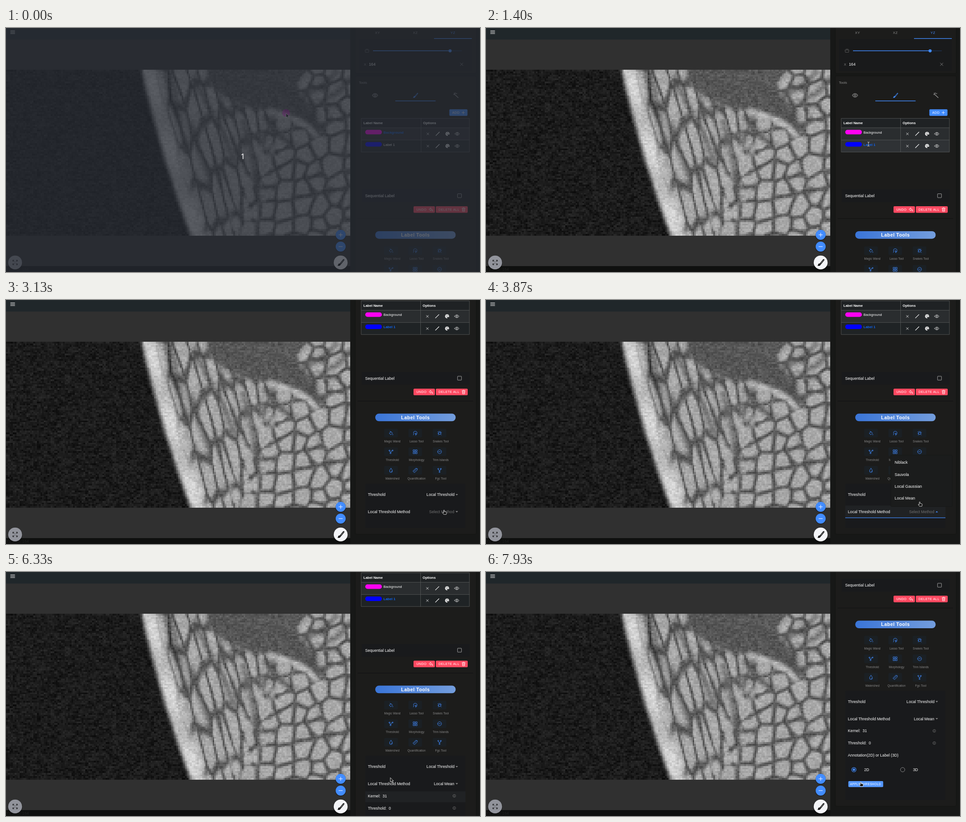
Animation of 1041 by 538 pixels, one loop 8 s. Source, as an HTML page with a canvas:

```html
<!DOCTYPE html>
<html lang="en">
<head>
<meta charset="utf-8">
<title>Label tools</title>
<style>
html, body { margin: 0; width: 100%; height: 100%; overflow: hidden; background: #303030; }
#scan { position: absolute; left: 0; top: 92px; width: 756px; height: 365.5px; image-rendering: pixelated; }
svg { position: absolute; left: 0; top: 0; font-family: "Liberation Sans", Arial, sans-serif; }
text { white-space: pre; }
</style>
</head>
<body>
<canvas id="scan" width="200" height="97"></canvas>
<svg id="ui" width="1041" height="538" viewBox="0 0 1041 538"></svg>
<script>
const BLUE = '#428cff', RED = '#ff4961', GREY = '#808080', WHITE = '#fff';
const clamp = (v, a = 0, b = 1) => Math.min(b, Math.max(a, v));
const mix = (a, b, k) => a + (b - a) * k;
const smooth = (a, b, v) => { const k = clamp((v - a) / (b - a)); return k * k * (3 - 2 * k); };
const hash = (x, y) => { const s = Math.sin(x * 127.1 + y * 311.7) * 43758.5453; return s - Math.floor(s); };

/* ---- scan picture ---- */

// distance between the two nearest jittered cell centres: 0 on a cell wall
function cells(x, y) {
  const cx = Math.floor(x), cy = Math.floor(y);
  let near = 9, next = 9;
  for (let j = cy - 1; j <= cy + 1; j++) for (let i = cx - 1; i <= cx + 1; i++) {
    const d = Math.hypot(i + .15 + .7 * hash(i, j) - x, j + .15 + .7 * hash(j + 40, i) - y);
    if (d < near) { next = near; near = d; } else if (d < next) next = d;
  }
  return next - near;
}

function tone(x, y) {
  const h = y - 92, d = x - (298 + .22 * h + .0002 * h * h);
  const long = cells((x - .27 * h) / 25, h / 105 + x / 160);
  const round = cells(x / 37, y / 39 + x / 190);
  const wall = mix(long, round, clamp((x - 510 + (y - 275) * .3) / 110));
  let v = mix(84, 168, smooth(0, .38, wall));
  v = mix(v, 198 + 14 * Math.sin(h / 23), clamp(1 - (d - 24) / 22));
  v -= 45 * Math.exp(-((d - 50) ** 2) / 60) * smooth(200, 0, h);
  return mix(27, v, smooth(-9, 9, d));
}

function paintScan() {
  const cv = document.getElementById('scan'), g = cv.getContext('2d');
  const w = cv.width, h = cv.height, k = 756 / w;
  const each = fn => {
    const im = g.getImageData(0, 0, w, h), p = im.data;
    for (let i = 0; i < w * h; i++) {
      const v = fn(i % w, Math.floor(i / w), p[i * 4]);
      p[i * 4] = p[i * 4 + 1] = p[i * 4 + 2] = v;
      p[i * 4 + 3] = 255;
    }
    g.putImageData(im, 0, 0);
  };
  const line = (v, width, ...pts) => {
    g.beginPath();
    for (let i = 0; i < pts.length; i += 2) g.lineTo(pts[i], pts[i + 1]);
    g.strokeStyle = g.fillStyle = `rgb(${v},${v},${v})`;
    g.lineWidth = width;
    width ? g.stroke() : g.fill();
  };
  each((x, y) => tone((x + .5) * k, 92 + (y + .5) * k));
  g.setTransform(1 / k, 0, 0, 1 / k, 0, -92 / k);
  g.lineCap = g.lineJoin = 'round';
  g.filter = 'blur(0.8px)';
  line(86, 0, 438, 85, 462, 140, 505, 166, 545, 180, 595, 178, 650, 203, 692, 240, 682, 178, 648, 150, 638, 118, 665, 85);
  line(78, 6, 362, 95, 372, 150, 385, 215);
  line(82, 7, 412, 105, 440, 165, 470, 215, 500, 290);
  line(80, 7, 400, 205, 425, 270, 450, 340);
  line(76, 7, 520, 205, 538, 265, 556, 385);
  line(72, 8, 568, 195, 592, 232, 632, 258);
  line(78, 7, 650, 150, 690, 130, 725, 98);
  line(82, 7, 690, 165, 730, 140, 756, 112);
  line(172, 9, 582, 185, 630, 200, 662, 218, 688, 247);
  line(208, 4, 582, 184, 630, 199, 662, 217, 684, 240);
  g.setTransform(1, 0, 0, 1, 0, 0);
  g.filter = 'none';
  each((x, y, v) => v + (hash(x + 7, y) + hash(x >> 1, y + 300) - 1) * (v < 45 ? 17 : 21));
}

/* ---- interface ---- */

const rect = (x, y, x2, y2, fill, r = 0, more = '') =>
  `<rect x="${x}" y="${y}" width="${x2 - x}" height="${y2 - y}" rx="${r}" fill="${fill}" ${more}/>`;
const disc = (x, y, r, fill, more = '') => `<circle cx="${x}" cy="${y}" r="${r}" fill="${fill}" ${more}/>`;
const stroke = (d, x, y, c, w = .9) =>
  `<path d="${d}" transform="translate(${x} ${y})" fill="none" stroke="${c}" stroke-width="${w}" stroke-linecap="round" stroke-linejoin="round"/>`;
const solid = (d, x, y, c) => `<path d="${d}" transform="translate(${x} ${y})" fill="${c}"/>`;
// y is the middle of the capitals
const text = (x, y, s, size = 8.67, fill = WHITE, more = '') =>
  `<text x="${x}" y="${y + size * .36}" font-size="${size}" fill="${fill}" ${more}>${s}</text>`;
const group = (id, body, more = '') => `<g id="${id}" ${more}>${body}</g>`;
const MID = 'text-anchor="middle"', BOLD = 'font-weight="bold"', WIDE = 'letter-spacing=".42"';

const CROSS = 'M-2.3-2.3L2.3 2.3M2.3-2.3L-2.3 2.3';
const PLUS = 'M-3 0H3M0-3V3';
const ring = (r, x = 0, y = 0) => `M${x - r} ${y}a${r} ${r} 0 1 0 ${2 * r} 0a${r} ${r} 0 1 0 ${-2 * r} 0`;
const eye = (x, y, c, k = 1) =>
  `<g transform="translate(${x} ${y}) scale(${k})">` +
  stroke('M-5 0Q0-6.6 5 0Q0 6.6-5 0Z' + ring(1.7), 0, 0, c, .9) + '</g>';
const brush = (x, y, c, k = 1) => `<g transform="translate(${x} ${y}) scale(${k})">` +
  stroke('M-.8 1.4L4.4-4.8M.4 2.4L5.4-3.8M4.4-4.8Q6-5.4 5.4-3.8M-.8 1.4L.4 2.4', 0, 0, c, 1) +
  solid('M-1.2 1.8Q-4 1.2-4 3.6Q-4.3 4.8-5.5 5Q-1 6.6.2 3Z', 0, 0, c) + '</g>';
const caret = (id, x, y) => `<path id="${id}" d="M-2.7-1.3H2.7L0 1.5Z" transform="translate(${x} ${y})" fill="#8c8c8c"/>`;
const info = y => stroke(ring(3.1) + 'M0-.4V1.7M0-1.6V-1.5', 984.5, y, GREY, .7);
const button = (x, y, x2, y2, c, label, lx) =>
  rect(x, y, x2, y2, c, 2) + text(lx, (y + y2) / 2, label, 7.05, WHITE, WIDE);

const tools = [
  ['Magic Wand', 'M-3.5 0L0-3.5L3.3 0L0 3.3ZM-2.2-4.3L0-2M4 2.5V4'],
  ['Lasso Tool', 'M-4 4Q-2.6 2-3.6 0Q-4.5-4 0-4.2Q4.5-4 4 0M0 0L4.2 1.8L2.2 2.3L1.5 4.3Z'],
  ['Snakes Tool', ring(2.6, .2, .5) + 'M-4-3L-2.5-2M-1-4.5L-.7-2.5M2.5-4L2-2M4.3-1L2.8-.3M-4 1H-2.5M3 3L4 4M-2 3L-3 4.2'],
  ['Threshold', ring(1.3, -3.2, -2.6) + ring(1.2, -1, 3.2) + ring(1.2, 3.6, -2.8) + 'M-2.8-1.4L-1.3 2M-.3 2.2L1-1.5L2.6-2'],
  ['Morphology', 'M-4.2-4.2H-.8V-.8H-4.2ZM.8-4.2H4.2V-.8H.8ZM-4.2.8H-.8V4.2H-4.2ZM.8.8H4.2V4.2H.8Z'],
  ['Trim Islands', ring(4.3) + 'M-2 0H2'],
  ['Watershed', 'M0-4.6Q3.3-.4 3.2 1.4A3.2 3.2 0 0 1-3.2 1.4Q-3.3-.4 0-4.6M1.7 1.6Q1.5 2.8.4 3'],
  ['Quantification', 'M-4.8 1.5L1.2-4.5L4.4-4L4.7-1L-1.5 4.8ZM-2.5 2L2.5-3'],
  ['Fgc Tool', ring(1.2, -2.8, -3.3) + ring(1.2, 2.8, -3.3) + ring(1.2, 0, 3.6) + 'M-2.8-2Q-2.8 0 0 .4Q2.8 0 2.8-2M0 .4V2.4']
];

function toolGrid() {
  return tools.map(([name, d], i) => {
    const c = i % 3, y = 491 + 41 * Math.floor(i / 3), x = [845.5, 898.7, 952.2][c];
    return rect(x - 15, y - 9.5, x + 15, y + 9.5, '#1b2024', 2) + stroke(d, x, y, BLUE) +
      text([848.5, 901.7, 954.8][c], y + 18, name, 6.5, '#858585', MID);
  }).join('');
}

function labelRow(n, y, color, name) {
  const icons = stroke(CROSS, 925.5, y + .2, WHITE, .8) + stroke('M-3.8 3.8L3.8-3.8', 947, y, WHITE, 1.2) +
    disc(968.7, y, 4.4, WHITE) + [[-2, -.8], [0, -2.4], [2, -.8], [-1.3, 1.6]].map(p => disc(968.7 + p[0], y + p[1], .8, '#222')).join('') +
    solid('M0 1L5 2V5H1Z', 968.7, y, '#26292b') + eye(990, y, '#ddd');
  return rect(789, y - 8.7, 825.5, y + 1.3, color, 5) +
    text(829, y - 3.2, name, 7.59, WHITE, `id="name${n}"`) + `<g class="opts">${icons}</g>`;
}

const cardEdge = 'stroke="#151614" stroke-width="1.5"';
const panel =
  rect(767, -30, 1033, 100.5, '#1c1c1b', 3, cardEdge) + rect(775, 24, 1023, 95, '#191a1b') +
  [['XY', 816], ['XZ', 899], ['YZ', 981.5]].map(([s, x], i) => text(x, 10.5, s, 7.6, i < 2 ? '#8c8c8c' : BLUE, MID + ' ' + WIDE)).join('') +
  rect(940, 22.6, 1023, 24, BLUE) +
  stroke('M-4-1.5H4L3.4 3.6H-3.4ZM-2.5-3.4H2.5', 793, 50, '#666', .8) +
  rect(806, 49.8, 1001, 50.9, '#20375f') + rect(806, 49.6, 975, 51, BLUE) + disc(975.3, 50.3, 3.4, BLUE) +
  text(786, 80, 'X', 7.6, GREY) + text(797, 80, '164') + stroke('M-3-3L3 3M3-3L-3 3', 1000.7, 80, '#858585') +
  rect(767, 105.5, 1033, 714, '#1c1c1b', 3, 'id="outer" ' + cardEdge) +
  text(775, 120.5, 'Tools', 7.6, '#909090') +
  rect(772, 419.5, 1026, 421, '#141514') +
  eye(810.5, 148.5, '#999', 1.2) + brush(899, 148.5, BLUE) +
  stroke('M-1 0L5 5.5M-4.8-1.5H-3.2M-1-5V-3.5M-3.8-4.5L-2.7-3.3M2-3.8L1.2-3M-2.2-1.2L-1 0', 988, 148, '#999', 1.3) +
  rect(855, 160, 943.5, 161.4, BLUE) +
  button(973.7, 179.3, 1013.5, 193.7, BLUE, 'ADD', 980) + stroke(PLUS, 1004.3, 186.6, WHITE, .8) +
  rect(781, 199.3, 1018, 220, '#1f2224') + rect(781, 220, 1018, 247, '#2a2d2f') +
  rect(781, 247, 1018, 273.5, '#1f2325', 0, 'id="row2"') +
  stroke('M780.5 199.3H1017.8V273.5H780.5ZM780.5 220H1017.8M780.5 247H1017.8', 0, 0, '#5b5d5e', .8) +
  group('split', stroke('M910.5 199.3V273.5', 0, 0, '#5b5d5e', .8) + text(915, 209.6, 'Options', 7.59, WHITE, BOLD)) +
  text(785, 209.6, 'Label Name', 7.59, WHITE, BOLD) +
  labelRow(1, 233.3, '#ff00f2', 'Background') + labelRow(2, 260.2, '#0000ff', 'Label 1') +
  rect(781, 356, 1018, 384, '#191a1c') + text(788.7, 369.8, 'Sequential Label') +
  rect(991.7, 365.5, 1000.3, 374.1, 'none', .5, 'stroke="#a0a0a0" stroke-width="1"') +
  button(895, 393, 942, 407.5, RED, 'UNDO', 901.3) +
  stroke('M-.5-3.6L-4-.5L-.5 2.6V.8Q3 .8 4 3.6Q4-1.8-.5-1.8Z', 933, 400.3, WHITE, .8) +
  button(944, 393, 1014, 407.5, RED, 'DELETE ALL', 950) +
  stroke('M-3.6-2.8H3.6M-2.8-2.8L-2.3 4H2.3L2.8-2.8M-1.2-2.8V-4H1.2V-2.8M-1-1V2.4M1-1V2.4', 1005, 400.3, WHITE, .8) +
  rect(811, 448, 987.5, 464.7, 'url(#pill)', 8) +
  text(899.3, 456.2, 'Label Tools', 10.4, WHITE, BOLD + ' ' + MID + ' letter-spacing=".54"') +
  toolGrid() +
  rect(789, 602.5, 1009, 700, '#191a1c', 2, 'id="form"') +
  rect(789, 650.6, 1009, 677.6, '#202224', 0, 'id="methodHover"') +
  rect(789, 677, 1009, 678.2, BLUE, 0, 'id="underline"') +
  text(794.8, 626.3, 'Threshold') + text(985, 626.3, 'Local Threshold', 8.67, WHITE, 'text-anchor="end"') + caret('c1', 990, 626.6) +
  text(794.8, 664.2, 'Local Threshold Method') +
  text(984.5, 664.2, 'Select Method', 8.67, '#707070', 'id="method" text-anchor="end"') + caret('c2', 990, 664.3) +
  group('more',
    rect(789, 681, 1009, 705, '#202224', 0, 'id="kernelHover"') +
    text(794.8, 691, 'Kernel:') + text(827, 691, '3', 8.67, WHITE, 'id="kernel"') + info(691) +
    text(794.8, 717.9, 'Threshold:') + text(840.5, 717.9, '0') + info(717.9) +
    text(794.8, 744.6, 'Annotation(2D) or Label (3D)') +
    disc(808, 776.6, 4.8, 'none', `stroke="${BLUE}" stroke-width="1.1"`) + disc(808, 776.6, 2.7, BLUE) + text(830.5, 776.3, '2D') +
    disc(915, 776.6, 4.8, 'none', 'stroke="#8c8c8c" stroke-width="1"') + text(937.8, 776.3, '3D') +
    rect(795.8, 801.6, 872.3, 815, BLUE, 2, 'id="apply"') + text(799.5, 808.4, 'APPLY THRESHOLD', 6.5, WHITE, 'letter-spacing=".39"'));

const fab = (x, y, r, c) => disc(x, y + 1, r + .8, '#000', 'opacity=".3"') + disc(x, y, r, c);
const frame =
  rect(0, 0, 756, 25.5, '#20272a') + rect(0, 525, 756, 538, '#0f100f') + text(0, 531.5, 'YZ slice: 164', 8.67, '#202020') +
  stroke('M10 6.2H19.3M10 9.2H19.3M10 12.2H19.3', 0, 0, WHITE, 1.1) +
  fab(735, 456, 11, BLUE) + stroke('M-4 0H4M0-4V4', 735, 456, WHITE, 1) +
  fab(735, 482, 11, BLUE) + stroke('M-4 0H4', 735, 482, WHITE, 1) +
  fab(735, 517, 15.3, '#f4f5f8') + brush(735, 517, '#000', 1.35) +
  fab(20, 517, 15.3, '#92949c') +
  stroke([[1, 1], [-1, 1], [1, -1], [-1, -1]].map(([a, b]) => `M${a * 1.6} ${b * 1.6}L${a * 5} ${b * 5}M${a * 2.4} ${b * 5}H${a * 5}V${b * 2.4}`).join(''), 20, 517, '#111', 1);

const popover = rect(889, 342, 1024, 455.5, '#1b1c1c', 2, 'stroke="#171817" stroke-width="1"') +
  ['Niblack', 'Sauvola', 'Local Gaussian', 'Local Mean'].map((s, i) => text(897.6, 358.2 + 26.3 * i, s)).join('');

const pointers =
  group('arrow', '<path d="M0 0V9.6L2.3 7.6L3.9 11L5.5 10.3L4 7H7Z" fill="#111" stroke="#fff" stroke-width=".8"/>') +
  group('hand', '<path d="M-.9.6Q0-.6.9.6V3.6L5 4.6Q5.8 5 5.6 6.5L4.8 9.8H-.6L-3.4 6.2Q-3.2 4.8-.9 6.2Z" fill="#111" stroke="#fff" stroke-width=".8"/>') +
  group('beam', stroke('M-2-4.8Q0-4.8 0-3.5Q0-4.8 2-4.8M0-3.5V3.5M-2 4.8Q0 4.8 0 3.5Q0 4.8 2 4.8', 0, 0, '#111', 2) +
    stroke('M-2-4.8Q0-4.8 0-3.5Q0-4.8 2-4.8M0-3.5V3.5M-2 4.8Q0 4.8 0 3.5Q0 4.8 2 4.8', 0, 0, WHITE, .9));

document.getElementById('ui').innerHTML =
  '<defs><linearGradient id="pill"><stop stop-color="#3a75d8"/><stop offset="1" stop-color="#739ddd"/></linearGradient></defs>' +
  frame + rect(756, 0, 1041, 538, '#171817') + group('panel', panel) + group('popover', popover) +
  disc(0, 0, 8.5, '#ff00f2', 'id="dot" opacity=".45"') + group('pointer', pointers) +
  group('dim', rect(0, 0, 1041, 538, '#282c34', 0, 'opacity=".72"') +
    text(520, 282.5, '1', 17, WHITE, MID + ' font-family="Noto Sans, sans-serif"'));

/* ---- motion ---- */

const LOOP = 8000, STEP = 200 / 3;
const moves = [
  [265, 615, 188], [520, 680, 180], [865, 840, 256], [1535, 840, 256], [1800, 808, 321], [2065, 808, 321],
  [2400, 846, 369], [2405, 846, 369], [2740, 866, 522], [3130, 962, 463], [3335, 962, 463], [3730, 952.5, 445],
  [3866, 952.5, 445], [4070, 935, 437], [4265, 935, 437], [5065, 872.3, 486.5], [5135, 872, 487],
  [5530, 863, 491.5], [6135, 863, 491.5], [6665, 803.5, 372], [7205, 803.5, 372], [7925, 823, 463]
];
const scrolls = [[1735, 0], [2065, 197.4], [6805, 197.4], [7130, 227.3], [7205, 227.3], [7800, 340.7]];

function at(keys, t, col) {
  const i = keys.findIndex(k => k[0] > t);
  if (i === 0) return keys[0][col];
  if (i < 0) return keys[keys.length - 1][col];
  const a = keys[i - 1], b = keys[i];
  return mix(a[col], b[col], smooth(a[0], b[0], t));
}

const el = {};
document.querySelectorAll('#ui [id]').forEach(e => el[e.id] = e);
const opts = document.querySelectorAll('.opts');
const set = (id, name, v) => el[id].setAttribute(name, v);
const show = (id, on) => set(id, 'visibility', on ? 'visible' : 'hidden');
const within = (t, a, b) => t >= a && t < b;

function render(time) {
  const t = Math.floor((time + 4) / STEP) * STEP + 1;
  const x = at(moves, t, 1), y = at(moves, t, 2);
  const picked = t > 1395, done = t > 4395, open = within(t, 3395, 4395);

  show('dim', t < 60);
  set('panel', 'transform', `translate(0 ${-at(scrolls, t, 1)})`);

  [['name1', !picked], ['name2', picked]].forEach(([id, on]) => {
    set(id, 'fill', on ? '#1064f0' : WHITE);
    set(id, 'font-weight', on ? 'bold' : 'normal');
  });
  const shift = `translate(${picked ? 0 : 1} 0)`;
  set('split', 'transform', shift);
  opts.forEach(e => e.setAttribute('transform', shift));
  set('row2', 'fill', within(t, 795, 1730) ? '#2f3235' : '#1f2325');

  const fade = smooth(3330, 3640, t) * (1 - smooth(4325, 4530, t));
  const grow = mix(.85, 1, smooth(3330, 3640, t));
  set('popover', 'opacity', fade);
  set('popover', 'transform', `translate(1000 455) scale(${grow}) translate(-1000 -455)`);
  set('underline', 'opacity', fade);
  show('methodHover', within(t, 3395, 5130));
  set('c2', 'fill', open ? BLUE : '#8c8c8c');
  set('c2', 'transform', `translate(990 664.3) scale(1 ${open ? -1 : 1})`);
  el.method.textContent = done ? 'Local Mean' : 'Select Method';
  set('method', 'fill', done ? WHITE : '#707070');

  set('more', 'display', done ? 'inline' : 'none');
  set('form', 'height', done ? 241 : 97.5);
  set('outer', 'height', done ? 751.8 : 608.5);
  set('kernelHover', 'opacity', within(t, 5195, 6865) ? 1 : 0);
  el.kernel.textContent = t > 5995 ? '31' : '3';
  set('apply', 'fill', t > 7860 ? '#5598ff' : BLUE);

  const hand = within(t, 2995, 4860) || t > 7860;
  const beam = within(t, 795, 1660) || within(t, 4860, 5930);
  const hidden = within(t, 5930, 6195);
  set('pointer', 'transform', `translate(${x} ${y})`);
  set('hand', 'display', hand ? 'inline' : 'none');
  set('beam', 'display', beam ? 'inline' : 'none');
  set('arrow', 'display', hand || beam || hidden ? 'none' : 'inline');
  set('dot', 'transform', `translate(${x} ${y - .5})`);
  show('dot', x < 756);
}

paintScan();
const start = performance.now();
function tick() {
  render((performance.now() - start) % LOOP);
  requestAnimationFrame(tick);
}
tick();
</script>
</body>
</html>
```
